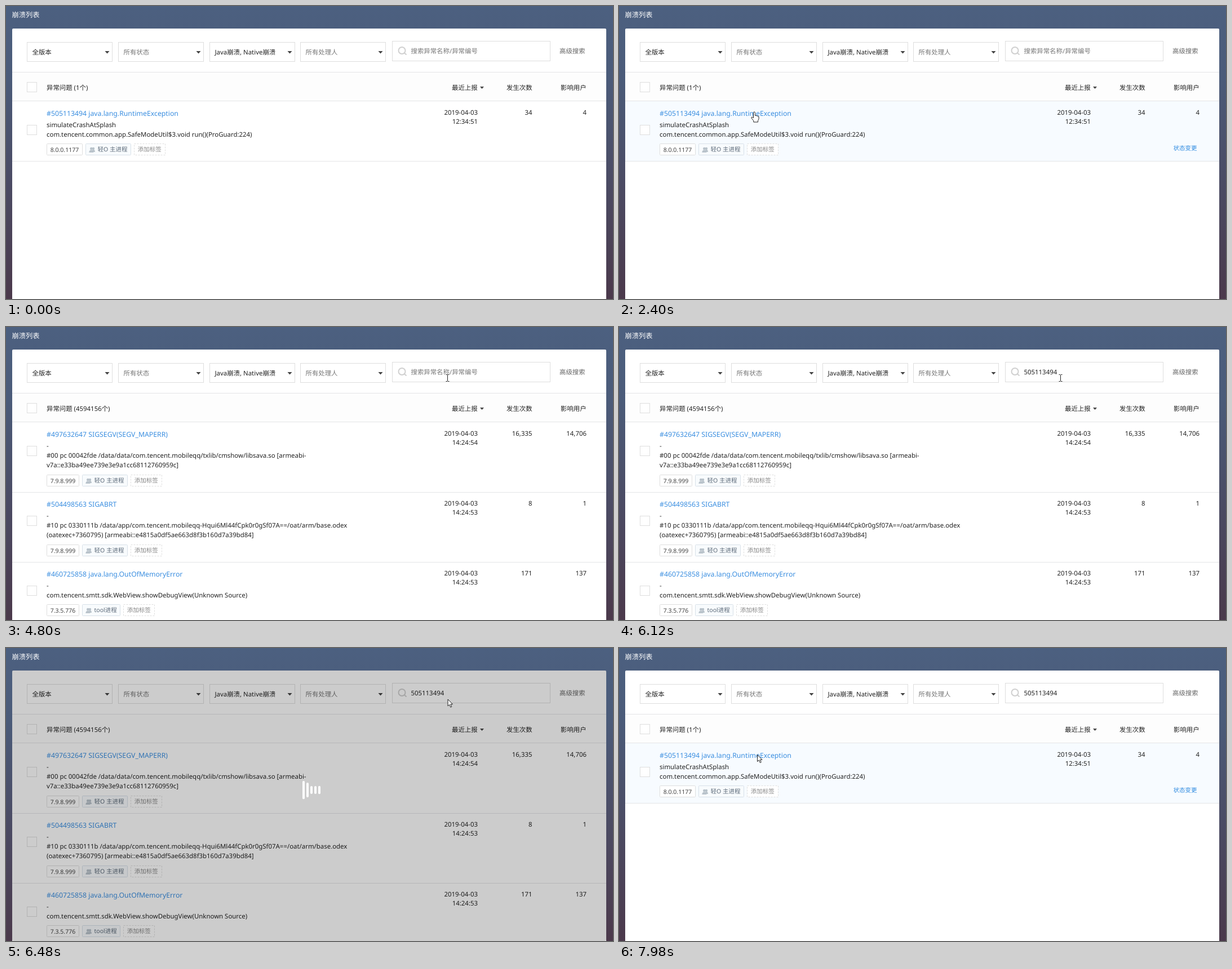
An HTML page that plays this animation: 1077 by 520 pixels, repeating every 8 s.

```html
<!DOCTYPE html>
<html lang="zh-CN">
<head>
<meta charset="utf-8">
<title>崩溃列表</title>
<style>
html, body { margin: 0; width: 100%; height: 100%; overflow: hidden; }
svg { display: block; }
text { font-family: 'Noto Sans', 'Noto Sans CJK SC', 'Noto Sans CJK', sans-serif; text-rendering: geometricPrecision; white-space: pre; }
</style>
</head>
<body>
<svg id="stage" width="1077" height="520" viewBox="0 0 1077 520"></svg>
<script>
const BODY = 11.42, LINK = 12.28, SMALL = 10.5;
const INK = '#222', MUTED = '#777', BLUE = '#3a8ee0', LINE = '#dedede';

const text = (x, y, s, fill = INK, size = BODY, anchor = 'start') =>
  `<text x="${x}" y="${y}" font-size="${size}" fill="${fill}" text-anchor="${anchor}">${s}</text>`;
const right = (x, y, s) => text(x, y, s, INK, BODY, 'end');
const box = (x, y, w, h, fill = '#fff', stroke = LINE, extra = '') =>
  `<rect x="${x + .5}" y="${y + .5}" width="${w - 1}" height="${h - 1}" fill="${fill}" stroke="${stroke}" ${extra}/>`;
const rule = y => `<path d="M11 ${y + .5}H1065" stroke="#e4e5e7"/>`;
const triangle = (x, y, r) => `<path d="M${x - r} ${y}h${2 * r}l${-r} ${r + .5}z" fill="#444"/>`;
const group = (id, body) => `<g id="${id}">${body}</g>`;
const check = y => box(37, y, 18, 18);

const pen = document.createElement('canvas').getContext('2d');
pen.font = `${SMALL}px 'Noto Sans', 'Noto Sans CJK SC', 'Noto Sans CJK', sans-serif`;
const tagWidth = (s, pad) => Math.round(pen.measureText(s).width + pad);

function select(label, i) {
  const x = Math.round(37 + 161.8 * i);
  return box(x, 64, 152, 35) + text(x + 9.5, 86, label, i % 2 ? MUTED : INK) + triangle(x + 142.5, 80, 4);
}

function people(x, y) {
  return `<g transform="translate(${x} ${y})" fill="#b9c3cb">
    <circle cx="7" cy="3" r="2.2"/><path d="M4 9q0-4 3-4t3 4z"/>
    <circle cx="3.4" cy="3.2" r="2.4"/><path d="M-.6 10q0-4.5 4-4.5t4 4.5z"/></g>`;
}

function tags(y, version, process) {
  const vw = tagWidth(version, 13.7), pw = tagWidth(process, 28);
  const px = 72 + vw + 5, ax = px + pw + 5;
  return box(72, y, vw, 21, '#fff', LINE, 'rx="1"') +
    text(78.7, y + 14.6, version, '#444', SMALL) +
    box(px, y, pw, 21, '#f8fbfd', '#d8e1e9', 'rx="1"') +
    people(px + 7, y + 6) +
    text(px + 21.5, y + 14.2, process, '#5d6b7a', SMALL) +
    box(ax, y, 56, 21, '#fff', LINE, 'stroke-dasharray="3 2"') +
    text(ax + 6.7, y + 14.2, '添加标签', '#868686', SMALL);
}

function entry(top, [title, sub, code, time, count, users, version, process]) {
  return check(top + 41) +
    text(72, top + 25, title, BLUE, LINK) +
    text(72, top + 44.8, sub) +
    code.map((s, i) => text(72, top + 62 + 17.2 * i, s)).join('') +
    right(837, top + 23, '2019-04-03') + right(837, top + 38.7, time) +
    right(933.5, top + 23, count) + right(1030, top + 23, users) +
    tags(Math.floor(top + 57 + 17.5 * code.length), version, process);
}

const found = ['#505113494 java.lang.RuntimeException', 'simulateCrashAtSplash',
  ['com.tencent.common.app.SafeModeUtil$3.void run()(ProGuard:224)'],
  '12:34:51', '34', '4', '8.0.0.1177', '轻O 主进程'];
const crashes = [
  ['#497632647 SIGSEGV(SEGV_MAPERR)', '-',
    ['#00 pc 00042fde /data/data/com.tencent.mobileqq/txlib/cmshow/libsava.so [armeabi-',
      'v7a::e33ba49ee739e3e9a1cc68112760959c]'],
    '14:24:54', '16,335', '14,706', '7.9.8.999', '轻O 主进程'],
  ['#504498563 SIGABRT', '-',
    ['#10 pc 0330111b /data/app/com.tencent.mobileqq-Hqui6Ml44fCpk0r0gSf07A==/oat/arm/base.odex',
      '(oatexec+7360795) [armeabi::e4815a0df5ae663d8f3b160d7a39bd84]'],
    '14:24:53', '8', '1', '7.9.8.999', '轻O 主进程'],
  ['#460725858 java.lang.OutOfMemoryError', '-',
    ['com.tencent.smtt.sdk.WebView.showDebugView(Unknown Source)'],
    '14:24:53', '171', '137', '7.3.5.776', 'tool进程']
];
const all = crashes.map((c, i) => entry(170 + 124 * i, c) + rule(293 + 124 * i)).join('');

const bars = [0, 1, 2, 3, 4].map(i => `<rect class="bar" x="${526 + 7 * i}" width="4" rx="2" fill="#fff"/>`).join('');

document.getElementById('stage').innerHTML = `
  <defs><linearGradient id="sky" x2="0" y2="1">
    <stop stop-color="#4c6080"/><stop offset=".25" stop-color="#4b5b79"/><stop offset="1" stop-color="#4b394b"/>
  </linearGradient></defs>
  <rect width="1077" height="520" fill="url(#sky)"/>
  ${text(10.5, 19.6, '崩溃列表', '#fff', LINK)}
  <rect x="11" y="40" width="1054" height="490" rx="2" fill="#fff"/>
  ${['全版本', '所有状态', 'Java崩溃, Native崩溃', '所有处理人'].map(select).join('')}
  ${box(685, 62, 281, 36)}
  <g fill="none" stroke="#cfcfcf" stroke-width="2"><circle cx="702.5" cy="79" r="6"/><path d="M706.5 83l4 3.5"/></g>
  ${group('hint', text(718.5, 84, '搜索异常名称/异常编号', MUTED))}
  ${group('query', text(718.5, 84, '505113494'))}
  ${text(982, 84, '高级搜索', '#666')}
  <rect x="11" y="118" width="1054" height="51" fill="#fdfdfd"/>
  ${rule(117)}${rule(168)}${check(135)}
  ${text(791, 149, '最近上报')}${triangle(844.5, 143, 3.5)}
  ${text(888, 149, '发生次数')}${text(984, 149, '影响用户')}
  ${group('one', `<rect id="tint" x="11" y="169" width="1054" height="106" fill="#f7fbff"/>${rule(275)}
    ${text(72, 149, '异常问题 (1个)')}${entry(170, found)}
    ${group('action', text(983.5, 256, '状态变更', '#2e8ae0', SMALL))}`)}
  ${group('many', text(72, 149, '异常问题 (4594156个)') + all)}
  <path id="caret" stroke="#222" d="M0 73v14"/>
  ${group('loading', `<rect x="11" y="40" width="1054" height="480" rx="2" opacity=".2"/>${bars}`)}
  <g id="pointer" fill="#fff" stroke="#222" stroke-linejoin="round">
    <path id="arrow" d="M.5.5v12l2.8-2.5 2 4.600 2-.9-2-4.400h3.700z"/>
    <path id="beam" fill="none" d="M-3-6h2.200l.8.8.8-.8H3M0-5.200V5.200M-3 6h2.200l.8-.8.8.8H3"/>
    <path id="hand" d="M-1.500 11V2Q-1.500.5 0 .5T1.500 2V7Q3.500 5.800 4 7.500 5.700 6.700 6.200 8.300 8 7.700 8 9.500V13L6.500 16V18.500H-1.200V16L-5 11.500Q-5.600 9.500-3.800 9.600z"/>
  </g>`;

// Pointer moves along Bezier curves and rests at the end until "until"
const smooth = f => f * f * (3 - 2 * f);
const link = [240, 187.5], field = [783.5, 90.5], pause = [957, 100], turn = [180, 112];
const moves = [
  { from: 300, to: 960, until: 2400, path: [[1070, 94], [950, 260], [330, 270], link] },
  { from: 2400, to: 2820, until: 2820, path: [link, [400, 150], [650, 80], [1100, 80]], ease: f => f * f },
  { from: 3840, to: 4500, until: 4500, path: [[1070, 34], [1040, 110], [1000, 115], pause], ease: f => f },
  { from: 4500, to: 4800, until: 5160, path: [pause, [900, 88], [840, 88], field] },
  { from: 6060, to: 6060, until: 6660, path: [field, field, field, field] },
  { from: 6660, to: 7140, until: 7140, path: [field, [600, 120], [300, 95], turn] },
  { from: 7140, to: 7500, until: 8000, path: [turn, [160, 150], [225, 178], [245, 189]] }
];

function pointerAt(t) {
  const m = moves.find(m => t >= m.from && t < m.until);
  if (!m) return null;
  const f = t >= m.to ? 1 : (m.ease || smooth)((t - m.from) / (m.to - m.from)), g = 1 - f;
  const [a, b, c, d] = m.path;
  return [0, 1].map(k => g * g * g * a[k] + 3 * g * g * f * b[k] + 3 * g * f * f * c[k] + f * f * f * d[k]);
}

const el = id => document.getElementById(id);
const show = (id, on) => el(id).style.display = on ? '' : 'none';
const within = (t, a, b) => t >= a && t < b;
const barEls = [...document.querySelectorAll('.bar')];
const easeOut = p => 1 - (1 - p) ** 4.8;

function barHeight(sec) {
  if (sec < 0) return 35;
  const p = sec % 1 * 2;
  return 35 * (p < 1 ? 1 - .6 * easeOut(p) : .4 + .6 * easeOut(p - 1));
}

// The caret blinks anew after each focus or edit
function caretOn(t) {
  const start = [6540, 5340, 4860].find(s => t >= s);
  return start && (t - start) % 960 < 480;
}

function draw(now) {
  const t = Math.floor(now % 8000 / 60) * 60;
  const many = within(t, 3720, 6540), busy = within(t, 6240, 6540), typed = t >= 5340;
  const pos = pointerAt(t), [x, y] = pos || [0, 0];
  const hover = pos && !many && within(y, 169, 275);
  const onLink = hover && within(x, 72, 306) && within(y, 183, 198) && t < 7980;
  const inField = pos && !busy && within(x, 685, 965) && within(y, 62, 98);

  show('many', many);
  show('one', !many);
  show('tint', hover);
  show('action', hover);
  show('hint', !typed);
  show('query', typed);
  show('loading', busy);
  barEls.forEach((b, i) => {
    const h = barHeight(.44 - .1 * i + (t - 6240) / 1000);
    b.setAttribute('y', 252 - h / 2);
    b.setAttribute('height', h);
  });

  show('caret', caretOn(t) && !busy);
  el('caret').setAttribute('transform', `translate(${typed ? 777.5 : 719.5})`);

  show('pointer', pos);
  show('hand', onLink);
  show('beam', inField);
  show('arrow', !onLink && !inField);
  el('pointer').setAttribute('transform', `translate(${x} ${y})`);
}

const start = performance.now();
(function frame() {
  draw(performance.now() - start);
  requestAnimationFrame(frame);
})();
</script>
</body>
</html>
```
